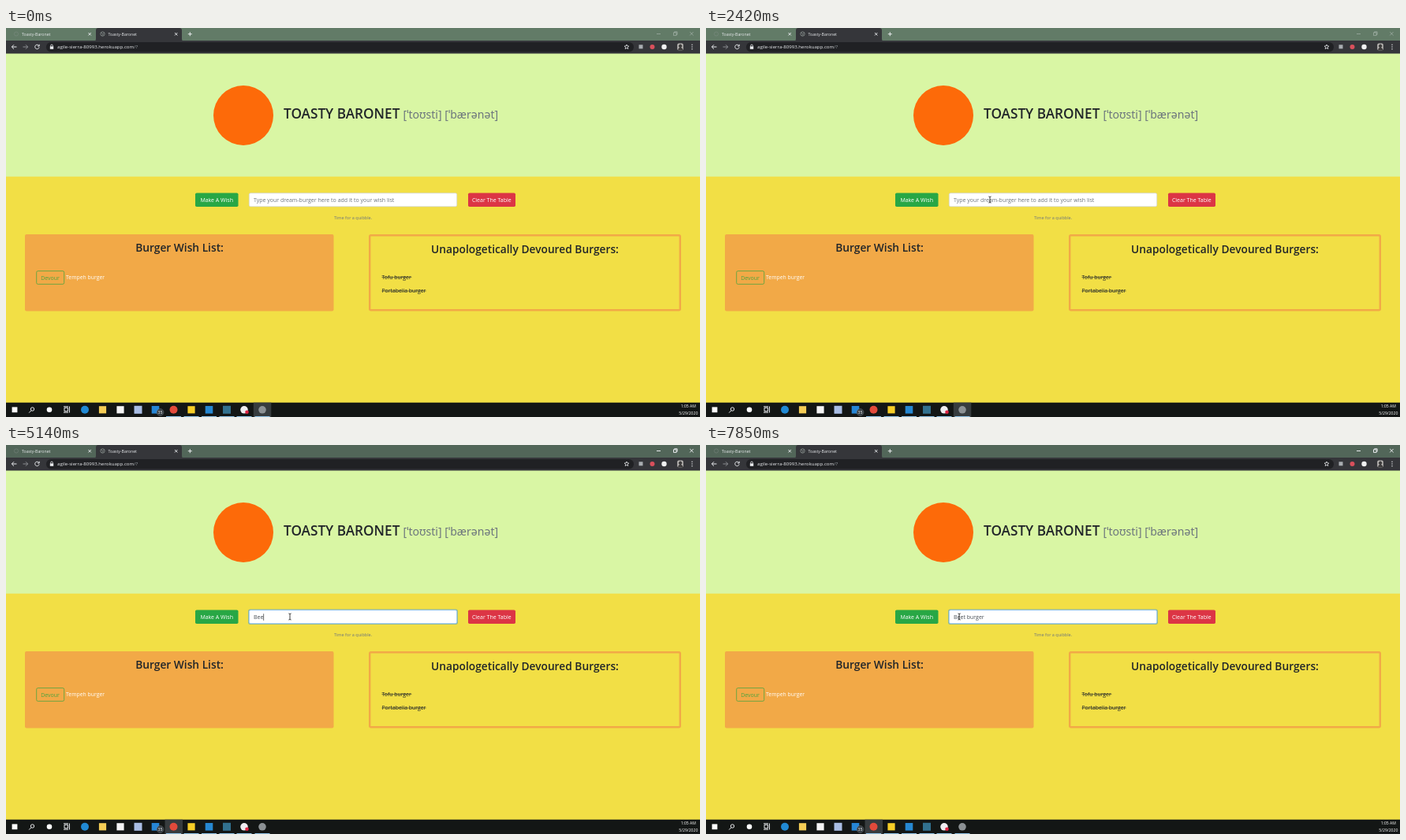
Animation of 880 by 494 pixels, one loop 8000 ms. Source, as an HTML page:

```html
<!DOCTYPE html>
<html lang="en">
<head>
<meta charset="utf-8">
<title>Toasty-Baronet</title>
<style>
  html, body { margin: 0; width: 100%; height: 100%; overflow: hidden; background: #f2df45; }
  svg { display: block; width: 100vw; height: 100vh; }
  text { font: 7px "Open Sans", "Noto Sans", sans-serif; fill: #212529; white-space: pre; }
  .mid { text-anchor: middle; }
  .white { fill: #fff; }
  .tab { font-size: 5.2px; fill: #e8eaed; }
  .url { font-size: 6.1px; fill: #e8eaed; }
  .title { font-size: 17.2px; font-weight: 600; }
  .ipa { font-family: "Noto Sans", sans-serif; font-size: 14.1px; fill: #6c757d; }
  .heading { font-size: 13.75px; font-weight: 600; text-anchor: middle; }
  .small { font-size: 5.5px; fill: #6c757d; text-anchor: middle; }
  .item { font-size: 6.85px; }
  .clock { font-size: 5.1px; fill: #fff; text-anchor: middle; }
  .option { font-size: 5.5px; font-weight: 600; fill: #e8eaed; }
  .line { fill: none; stroke: #e8eaed; stroke-width: 1; }
</style>
</head>
<body>
<svg viewBox="0 0 880 494">
  <!-- browser -->
  <rect id="strip" width="880" height="17"/>
  <path d="M112 16.5Q114 16.5 114 14V3Q114 0 117 0H220Q223 0 223 3V14Q223 16.5 225 16.5Z" fill="#35363a"/>
  <rect y="16" width="880" height="17" fill="#35363a"/>
  <rect x="51" y="18" width="745" height="12.5" rx="6.2" fill="#202124"/>
  <g fill="none" stroke="#8d9692" stroke-width=".8">
    <circle cx="13" cy="7.5" r="2.6" opacity=".45"/>
    <circle cx="122.5" cy="7.5" r="2.7"/>
    <path d="M120.5 6l2 1.5 2-1M121.5 9.5l2-1"/>
  </g>
  <text class="tab" x="20" y="9.7">Toasty-Baronet</text>
  <text class="tab" x="129.5" y="9.7">Toasty-Baronet</text>
  <path class="line" d="M104.5 6l3.4 3.4m0-3.4l-3.4 3.4M214 6l3.4 3.4m0-3.4l-3.4 3.4M230.8 7.7h5m-2.5-2.5v5"/>
  <path id="controls" class="line" stroke-width=".8" d="M825 7.5h5M846.5 5.8h3.6v3.6h-3.6ZM847.6 5.8v-1h3.5v3.5h-1M867.2 5l4.4 4.4m0-4.4l-4.4 4.4"/>
  <path class="line" d="M13.5 24H7.3m2.7-2.7L7.3 24l2.7 2.7"/>
  <path class="line" style="stroke:#8b8d91" d="M21.5 24h6.2m-2.7-2.7l2.7 2.7-2.7 2.7"/>
  <path class="line" d="M41.5 22.2a2.7 2.7 0 1 0 .6 2.2M42.2 20.8v2.2h-2.2"/>
  <path d="M55.8 23.3h4.4v3.5h-4.4Z" fill="#e8eaed"/>
  <path class="line" d="M56.6 23.5v-1a1.4 1.4 0 0 1 2.8 0v1" style="stroke-width:.8"/>
  <text class="url" x="65" y="26.2">agile-sierra-80993.herokuapp.com<tspan fill="#9aa0a6">/?</tspan></text>
  <path class="line" style="stroke-width:.8" d="M787 21l.8 1.9 2.1.2-1.6 1.4.5 2-1.8-1.1-1.8 1.1.5-2-1.6-1.4 2.1-.2Z"/>
  <rect x="802.5" y="21.3" width="5" height="5" fill="#a9adb1"/>
  <circle cx="819.5" cy="24" r="3" fill="#d9505c"/>
  <circle cx="834.5" cy="24" r="3.2" fill="#f1f1f1"/>
  <rect x="851.2" y="19.6" width="7.6" height="8.8" rx="2" fill="#b9b6b3"/>
  <path d="M852 28.4q.3-3 2.2-3.6a2.1 2.1 0 1 1 1.8 0q2.2.6 2.4 3.6Z" fill="#3d3c3c"/>
  <path d="M870 21.2v.1m0 2.6v.1m0 2.6v.1" stroke="#e8eaed" stroke-width="1.4" stroke-linecap="round"/>

  <!-- page -->
  <rect y="188.7" width="880" height="288" fill="#f2df45"/>
  <rect y="32.5" width="880" height="156.2" fill="#d9f6a4"/>
  <circle cx="301" cy="111" r="38" fill="#fd6a09"/>
  <text class="title" x="352" y="115">TOASTY BARONET</text>
  <text class="ipa" x="503.5" y="115">[ˈtoʊsti] [ˈbærənət]</text>

  <rect x="240" y="209.5" width="54.5" height="17.5" rx="1.8" fill="#28a745"/>
  <text class="white mid" x="267.2" y="220.8">Make A Wish</text>
  <rect id="glow" x="307" y="208.5" width="266" height="19.4" rx="2.6" fill="#007bff" opacity=".38"/>
  <rect id="field" x="308.3" y="209.7" width="263.4" height="17" rx="1.8" fill="#fff" stroke-width=".7"/>
  <text id="entry" x="314" y="221.2"></text>
  <rect id="caret" y="214.3" width=".7" height="8.6" fill="#333"/>
  <rect x="586" y="209.5" width="60" height="17.5" rx="1.8" fill="#dc3545"/>
  <text class="white mid" x="615.8" y="220.8">Clear The Table</text>
  <text class="small" x="440" y="243">Time for a quibble.</text>

  <rect x="24" y="262" width="391.5" height="97.5" rx="2" fill="#f2a947"/>
  <text class="heading" x="220" y="283.5">Burger Wish List:</text>
  <rect x="38.7" y="308.6" width="35" height="16.7" rx="1.8" fill="none" stroke="#4da53f" stroke-width=".8"/>
  <text class="mid" x="56.1" y="319.6" style="fill:#4da53f">Devour</text>
  <text class="item white" x="76" y="318.8">Tempeh burger</text>
  <rect x="461.2" y="263.2" width="393.6" height="95" rx="1.5" fill="none" stroke="#f2a947" stroke-width="2.4"/>
  <text class="heading" x="658" y="286">Unapologetically Devoured Burgers:</text>
  <text class="item" x="476.5" y="318.8">Tofu burger</text>
  <text class="item" x="476.5" y="336.2">Portabella burger</text>
  <path d="M476.5 316.6H514.3M476.5 334H532.6" stroke="#212529" stroke-width=".6"/>

  <g id="menu">
    <rect x="308" y="228" width="88" height="106" rx="1.5" fill="#292a2d"/>
  </g>

  <!-- taskbar -->
  <rect y="475.7" width="880" height="18.3" fill="#131615"/>
  <rect id="active" y="475.7" width="22.5" height="18.3" fill="#373c3e"/>
  <g id="icons"></g>
  <circle cx="33.5" cy="484" r="2.2" class="line"/>
  <path class="line" d="M32 485.7l-2.8 2.9M74 482.3h4.5v4.4H74ZM73 480.8h6M73 488.2h6M80.5 480.5v8"/>
  <circle cx="195.5" cy="488" r="4.4" fill="#343b40" stroke="#8b9297" stroke-width=".4"/>
  <text class="clock" x="195.5" y="489.9">35</text>
  <text class="clock" x="865.3" y="482.4">1:05 AM</text>
  <text class="clock" x="865.3" y="491.2">5/29/2020</text>

  <path id="arrow" d="M0 0V7.1L1.7 5.6 2.8 8.1 4 7.6 2.9 5.2H5.1Z" fill="#fff" stroke="#111" stroke-width=".6"/>
  <path id="beam" d="M-1.6-4Q0-4 0-3Q0-4 1.6-4M0-3V3M-1.6 4Q0 4 0 3Q0 4 1.6 4" fill="none" stroke="#111" stroke-width=".8"/>
</svg>
<script>
const LOOP = 8000, FPS = 7;
const FOCUS = 2850, MENU_OPEN = 3420;
const PLACEHOLDER = "Type your dream-burger here to add it to your wish list";
const TYPED = "Beet burger";
const KEY_TIMES = [4570, 4850, 5000, 5420, 5700, 5990, 6280, 6420, 6700, 6850, 6990];
const OPTIONS = ["meow burger", "Norina Velk", "yuck", "Activity", "Norina B Velk", "f"];
// time, x, y
const MOUSE = [[700, 325, 500], [1290, 315, 290], [1700, 315, 290], [2290, 360, 218],
               [7140, 360, 218], [7850, 317, 218]];
// centre x, half size, colour, round, running
const ICONS = [
  [11, 3.4, "#fff"], [55, 3.3, "#fff", true], [100, 5, "#2189d4", true],
  [122.5, 4.6, "#f5cd56"], [145, 4.6, "#f4f4f4"], [167.5, 5, "#a9bde4"],
  [189.5, 4.8, "#2685d5"], [212.5, 5, "#e24a3b", true, true],
  [235, 4.6, "#f7ce27", false, true], [257.5, 4.8, "#2687d1", false, true],
  [280, 5, "#32718f", false, true], [302, 4.8, "#efedf0", true, true],
  [325, 4.8, "#8c9194", true, true]
];

const $ = id => document.getElementById(id);
function add(parent, tag, attrs, content = "") {
  const node = document.createElementNS(parent.namespaceURI, tag);
  for (const key in attrs) node.setAttribute(key, attrs[key]);
  node.textContent = content;
  return parent.appendChild(node);
}
const show = (id, on) => $(id).setAttribute("visibility", on ? "visible" : "hidden");

for (const [x, r, fill, round, running] of ICONS) {
  if (round) add($("icons"), "circle", { cx: x, cy: 484.8, r, fill });
  else add($("icons"), "rect", { x: x - r, y: 484.8 - r, width: 2 * r, height: 2 * r, fill });
  if (running) add($("icons"), "rect", { x: x - 9.5, y: 493, width: 19, height: 1, fill: "#8fc4e8" });
}
add($("icons"), "circle", { cx: 305.5, cy: 487.8, r: 2.3, fill: "#df2444" });
OPTIONS.forEach((label, i) =>
  add($("menu"), "text", { class: "option", x: 313.5, y: 241.9 + 16.5 * i }, label));

function mouseAt(t) {
  const next = MOUSE.findIndex(point => point[0] > t);
  if (next < 0) return MOUSE.at(-1).slice(1);
  if (next === 0) return MOUSE[0].slice(1);
  const [t0, x0, y0] = MOUSE[next - 1], [t1, x1, y1] = MOUSE[next];
  const p = (t - t0) / (t1 - t0), ease = p * p * (3 - 2 * p);
  return [x0 + (x1 - x0) * ease, y0 + (y1 - y0) * ease];
}

function draw(t) {
  const focused = t >= FOCUS;
  const count = KEY_TIMES.filter(time => time <= t).length;
  $("strip").setAttribute("fill", focused ? "#526659" : "#627b67");
  $("controls").setAttribute("opacity", focused ? 1 : .35);
  $("active").setAttribute("x", focused ? 201.5 : 313.8);
  $("field").setAttribute("stroke", focused ? "#80bdff" : "#ced4da");
  show("glow", focused);
  show("menu", t >= MENU_OPEN && !count);

  const entry = $("entry");
  entry.textContent = count ? TYPED.slice(0, count) : PLACEHOLDER;
  entry.style.fill = count ? "#495057" : "#6c757d";
  const lastInput = count ? KEY_TIMES[count - 1] : FOCUS;
  show("caret", focused && (t - lastInput) % 1060 < 530);
  $("caret").setAttribute("x", 314 + (count ? entry.getSubStringLength(0, count) : 0));

  const [x, y] = mouseAt(t);
  const overField = y > 209 && y < 227;
  for (const id of ["arrow", "beam"]) $(id).setAttribute("transform", `translate(${x} ${y})`);
  show("arrow", t >= MOUSE[0][0] && !overField);
  show("beam", overField);
}

function tick() {
  const step = Math.floor((performance.now() % LOOP + 4) * FPS / 1000) % (LOOP * FPS / 1000);
  draw(step * 1000 / FPS);
  requestAnimationFrame(tick);
}
tick();
</script>
</body>
</html>
```
